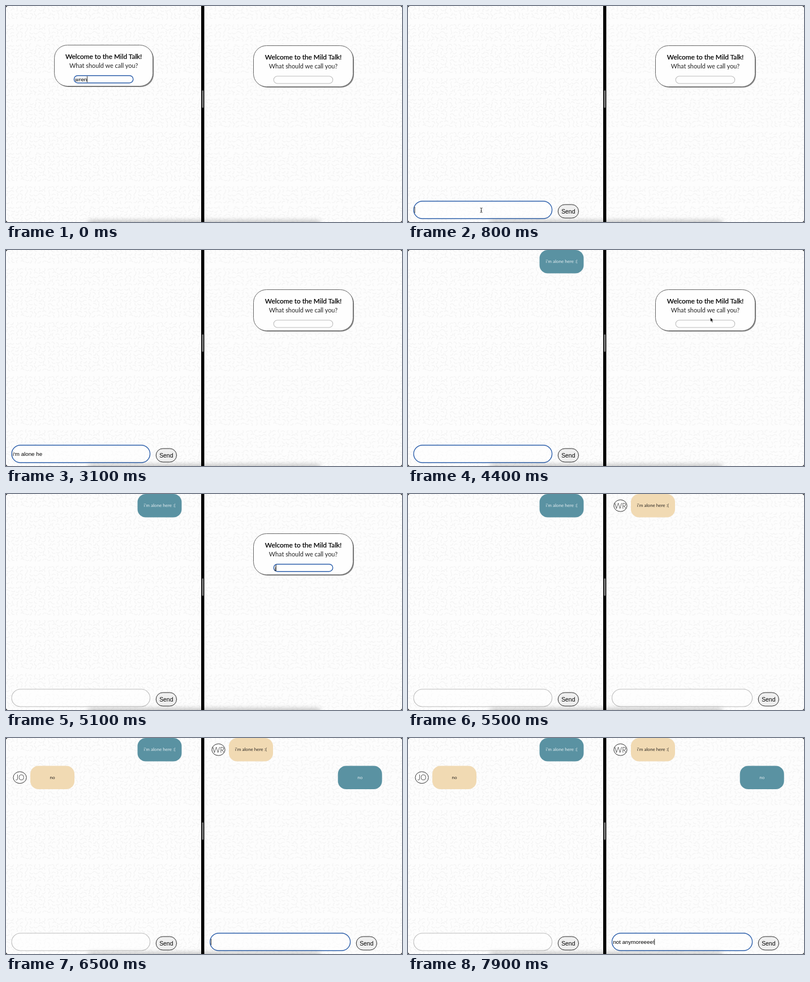
Animation, 700 px wide and 384 px high, one loop 8000 ms. Source, as an HTML page:

```html
<!DOCTYPE html>
<html lang="en">
<head>
<meta charset="utf-8">
<title>Two chat windows</title>
<style>
  html, body { margin: 0; width: 100%; height: 100%; overflow: hidden; background: #000; }
  svg { display: block; width: 700px; height: 384px; }
  text { white-space: pre; }
  .soft { font-family: Lato, "Open Sans", sans-serif; text-anchor: middle; }
  .head { font-size: 11.85px; fill: #000; stroke: #000; stroke-width: .25px; }
  .sub { font-size: 10.9px; fill: #222; }
  .ui { font-family: "Liberation Sans", Arial, sans-serif; }
  .typed { font-size: 9.75px; fill: #000; }
  .send { font-size: 10.4px; fill: #000; text-anchor: middle; }
  .field { fill: #fff; fill-opacity: .6; stroke: #bdbdbd; stroke-width: 1.1px; }
  .field.on { stroke: #2f61ac; stroke-width: 1.4px; }
  .card { fill: #fefefe; stroke: #666; stroke-width: 1px; }
  .button { fill: #efefef; stroke: #2b2b2b; stroke-width: 1px; }
  .mine { fill: #5a92a2; }
  .theirs { fill: #f1dab3; }
  .say { font-size: 8.1px; }
  .mine + .say { fill: #e3edf0; }
  .theirs + .say { fill: #2a2622; }
  .ring { fill: #fff; stroke: #333; stroke-width: 1px; }
  .initials { font-size: 13px; font-weight: 300; fill: #111; }
</style>
</head>
<body>
<svg id="stage" viewBox="0 0 700 384" xmlns="http://www.w3.org/2000/svg">
  <defs>
    <pattern id="paperL" y="30" width="96" height="96" patternUnits="userSpaceOnUse">
      <path id="squiggles" fill="none" stroke="#f3f3f3" stroke-width="1.3" stroke-linecap="round"/>
    </pattern>
    <pattern id="paperR" x="350.5" y="30" width="96" height="96" patternUnits="userSpaceOnUse">
      <use href="#squiggles"/>
    </pattern>
    <filter id="blur" x="-10%" y="-300%" width="120%" height="700%">
      <feGaussianBlur stdDeviation="5"/>
    </filter>
  </defs>
  <rect width="700" height="384" rx="4" fill="#fdfdfd"/>
  <rect width="345" height="384" rx="4" fill="url(#paperL)"/>
  <rect x="350.5" width="349.5" height="384" rx="4" fill="url(#paperR)"/>
  <g id="scene"></g>
  <rect x="145" y="382" width="410" height="12" fill="#000" opacity=".27" filter="url(#blur)"/>
  <rect x="345" width="5.5" height="384" fill="#000"/>
  <rect x="346.6" y="150" width="2.4" height="31" rx="1.2" fill="#8a8a8a"/>
  <path id="arrow" d="M0 0V7.6L1.8 6L3.1 9L4.4 8.4L3.2 5.5H5.5Z"
        fill="#000" stroke="#fff" stroke-width=".6"/>
  <path id="beam" d="M-2-4Q0-4 0-3Q0-4 2-4M0-3V3M-2 4Q0 4 0 3Q0 4 2 4M-1 1H1"
        fill="none" stroke="#222" stroke-width=".9"/>
</svg>
<script>
const LOOP = 8000, STEP = 100;
const $ = id => document.getElementById(id);
const scene = $('scene');

function add(parent, tag, attrs, text) {
  const el = document.createElementNS('http://www.w3.org/2000/svg', tag);
  for (const k in attrs) el.setAttribute(k, attrs[k]);
  if (text) el.textContent = text;
  return parent.appendChild(el);
}

// Background doodles: short seeded curves in two bands per tile
let seed = 17;
const rnd = () => (seed = seed * 16807 % 2147483647) / 2147483647;
let doodle = '';
for (let row = 0; row < 13; row++) {
  for (let col = 0; col < 12; col++) {
    const x = 4 + col * 8 + (rnd() - .5) * 3;
    const y = (row < 5 ? 4.5 + row * 6.6 : 6.5 + row * 6.7) + (rnd() - .5) * 2;
    const a = rnd() * Math.PI, dx = 3 * Math.cos(a), dy = 2.5 * Math.sin(a);
    const bend = rnd() < .5 ? 1 : -1;
    doodle += `M${x - dx} ${y - dy}Q${x - dy * bend} ${y + dx * bend} ${x + dx} ${y + dy}`;
  }
}
$('squiggles').setAttribute('d', doodle);

const windows = [];   // parts shown from one time to another
function group(from, to) {
  const el = add(scene, 'g', {});
  windows.push({ el, from, to });
  return el;
}

const fields = [];
// keys: [time, text]; a trailing "|" draws the caret
function field(g, x, y, w, h, focus, keys) {
  const box = add(g, 'rect', { class: 'field', x, y, width: w, height: h, rx: h / 2 });
  const base = y + h / 2 + 3.5;
  const text = add(g, 'text', { class: 'ui typed', x: x + 1.8, y: base });
  const caret = add(g, 'path', { stroke: '#000', 'stroke-width': .8 });
  fields.push({ box, text, caret, x: x + 2, base, focus, keys });
}

function welcome(from, to, cx, y, w, focus, keys) {
  const g = group(from, to), x = cx - w / 2;
  add(g, 'rect', { x: x + 1.6, y: y + 1.6, width: w, height: 73, rx: 23, fill: '#858585' });
  add(g, 'rect', { class: 'card', x, y, width: w, height: 73, rx: 23 });
  add(g, 'text', { class: 'soft head', x: cx, y: y + 24.6 }, 'Welcome to the Mild Talk!');
  add(g, 'text', { class: 'soft sub', x: cx, y: y + 40.2 }, 'What should we call you?');
  field(g, cx - 52.3, y + 54.2, 104.5, 13, focus, keys);
}

function composer(from, x, w, buttonX, focus, keys) {
  const g = group(from, LOOP);
  field(g, x, 347, w, 31, focus, keys);
  add(g, 'rect', { class: 'button', x: buttonX, y: 353, width: 36.3, height: 24, rx: 12 });
  add(g, 'text', { class: 'ui send', x: buttonX + 18.1, y: 368.8 }, 'Send');
}

function bubble(from, x, y, kind, text, initials) {
  const g = group(from, LOOP);
  add(g, 'rect', { class: kind, x, y, width: 78, height: 41.5, rx: 14.5 });
  add(g, 'text', { class: 'soft say', x: x + 39, y: y + 23.4 }, text);
  if (!initials) return;
  const cx = x - 18.5, cy = y + 20.8;
  add(g, 'ellipse', { class: 'ring', cx, cy, rx: 11.6, ry: 10.4 });
  add(g, 'text', { class: 'soft initials', x: cx, y: cy + 4.7 }, initials);
}

// Adds one character per step after a fixed start
const typing = (t, start, chars) =>
  [...chars].map((c, i) => [t + i * STEP, start + chars.slice(0, i + 1) + '|']);

const alone = "i'm alone ", here = alone + 'here ';
welcome(0, 200, 172.6, 69.5, 174, [0, 200], [[0, 'wren|']]);
welcome(0, 5500, 525.5, 70.5, 176, [4700, 5500],
  [[0, ''], [4700, '|'], [5100, 'j|'], [5200, 'jo|'], [5300, 'joss|']]);
composer(200, 10, 244.6, 265.2, [800, 4700], [
  [0, ''], [800, '|'], [1000, '|'], [1100, 'i|'],
  ...typing(1300, 'i', "'m "),
  ...typing(1700, "i'm ", 'alone '),
  [2300, alone + 'he|'], [2400, alone + 'hee|'],
  [2600, alone + 'he|'], [2700, alone + 'h|'], [2800, alone + '|'],
  [3000, alone + 'h|'], [3100, alone + 'he'], [3200, alone + 'here|'],
  [3300, here + '|'], [3500, here + ':|'], [3600, here + ':(|'], [3800, '']
]);
composer(5500, 360.6, 248, 619.2, [6000, LOOP], [
  [0, ''], [6000, '|'], [6200, 'n|'], [6300, 'no|'], [6500, '|'],
  ...typing(6600, '', 'not an'),
  [7200, 'not anym|'], [7300, 'not anymor|'], [7400, 'not anymore|'],
  ...typing(7600, 'not anymore', 'eee!')
]);
bubble(3800, 232.5, 0, 'mine', "i'm alone here :(");
bubble(5500, 394, 0, 'theirs', "i'm alone here :(", 'WR');
bubble(6500, 586.7, 49.5, 'mine', 'no');
bubble(6500, 43, 49.5, 'theirs', 'no', 'JO');

// Pointer trips: [time, x, y], then when it hides and when it turns into a text beam
const trips = [
  { path: [[500, 141, 292], [700, 130, 358], [800, 129.5, 363]], hide: 1000, beam: 700 },
  { path: [[4100, 300, 300], [4200, 400, 236], [4300, 490, 160], [4400, 534.5, 120], [4600, 538, 131]],
    hide: 5100, beam: 4600 },
  { path: [[5700, 505, 293], [5900, 478, 356], [6000, 476, 363]], hide: 6200, beam: 5900 }
];

function along(path, t) {
  const i = path.findIndex(p => p[0] > t);
  if (i < 0) return path[path.length - 1].slice(1);
  const a = path[i - 1], b = path[i], k = (t - a[0]) / (b[0] - a[0]);
  return [a[1] + (b[1] - a[1]) * k, a[2] + (b[2] - a[2]) * k];
}

const show = (el, on) => el.setAttribute('display', on ? 'inline' : 'none');

function draw(t) {
  for (const w of windows) show(w.el, t >= w.from && t < w.to);

  for (const f of fields) {
    const state = f.keys.filter(k => k[0] <= t).pop()[1];
    const focused = t >= f.focus[0] && t < f.focus[1];
    const hasCaret = state.endsWith('|');
    f.box.classList.toggle('on', focused);
    f.text.textContent = hasCaret ? state.slice(0, -1) : state;
    show(f.caret, hasCaret);
    if (hasCaret) {
      const x = f.x + f.text.getComputedTextLength();
      f.caret.setAttribute('d', `M${x} ${f.base - 9}V${f.base + 2}`);
    }
  }

  const trip = trips.find(p => t >= p.path[0][0] && t < p.hide);
  const isBeam = trip && t >= trip.beam;
  show($('arrow'), trip && !isBeam);
  show($('beam'), isBeam);
  if (trip) {
    const [x, y] = along(trip.path, t);
    $(isBeam ? 'beam' : 'arrow').setAttribute('transform', `translate(${x} ${y})`);
  }
}

const start = performance.now();
let last = -1;
function tick() {
  const t = Math.floor((performance.now() - start) % LOOP / STEP) * STEP;
  if (t !== last) draw(last = t);
  requestAnimationFrame(tick);
}
tick();
</script>
</body>
</html>
```
